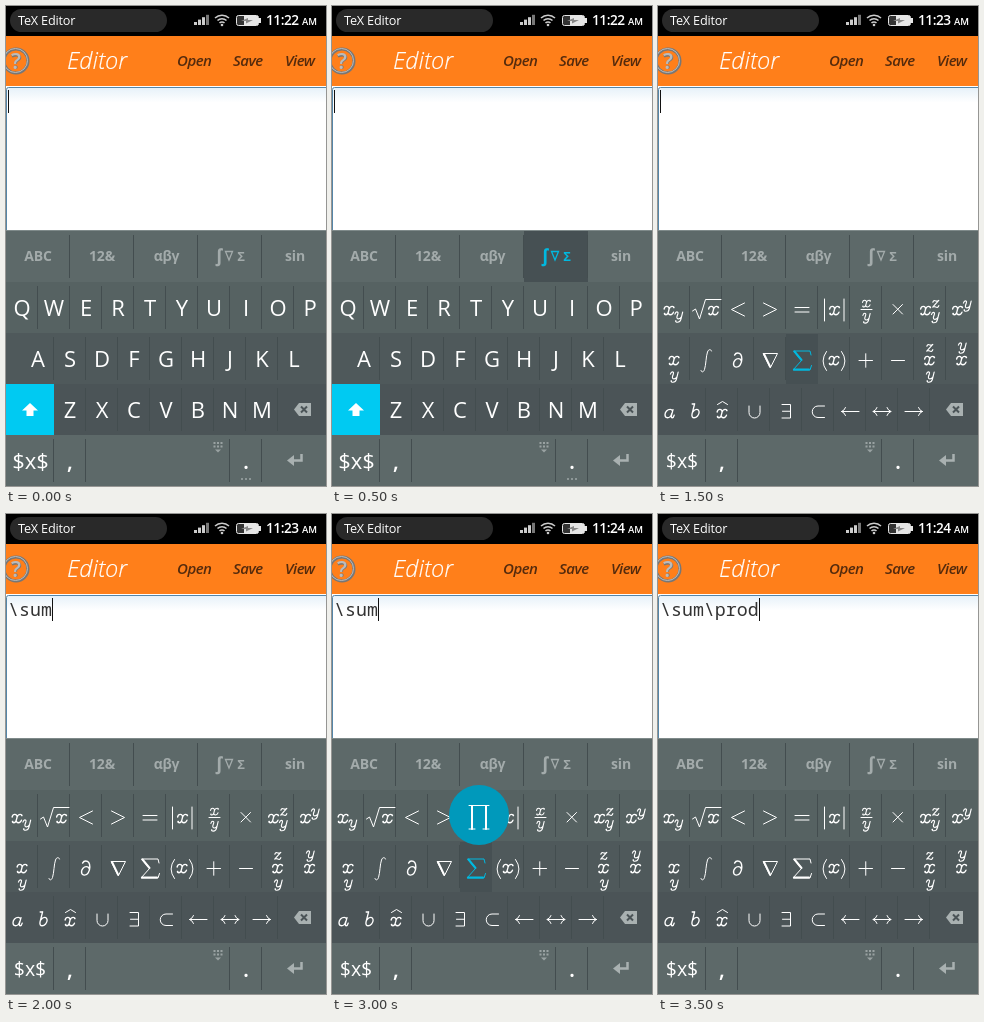
These frames come from a looping animation (320 px wide and 480 px high, 4 s). An HTML page:

```html
<!DOCTYPE html>
<html lang="en">
<head>
<meta charset="utf-8">
<title>TeX Editor</title>
<style>
html, body { margin: 0; width: 100%; height: 100%; overflow: hidden; background: #000; }
svg { display: block; width: 320px; height: 480px; font-family: "Open Sans", "Noto Sans", sans-serif; }
.mid { text-anchor: middle; }
.key { font-size: 22px; fill: #fff; }
.tab { font-size: 14px; font-weight: 700; letter-spacing: -.2px; fill: currentColor; }
.menu { font-size: 15px; font-style: italic; font-weight: 600; letter-spacing: -.5px; fill: #552b0d; }
.code { font: 18.3px "Noto Sans Mono", "DejaVu Sans Mono", monospace; fill: #333; white-space: pre; }
.ink { fill: none; stroke: #fff; stroke-linecap: round; stroke-linejoin: round; }
.letter { stroke-width: 1.35; }
.stem { stroke-width: 2; }
</style>
</head>
<body>
<svg id="stage" viewBox="0 0 320 480"></svg>
<script>
const CYAN = '#00b9e0', PRESSED = '#465053', ICON = '#a9b1b1', TAB = '#a3abab';

const rect = (x, y, w, h, fill, extra = '') =>
  `<rect x="${x}" y="${y}" width="${w}" height="${h}" fill="${fill}" ${extra}/>`;
const text = (s, x, y, cls, extra = '') => `<text x="${x}" y="${y}" class="${cls}" ${extra}>${s}</text>`;
const path = (d, extra = '') => `<path d="${d}" ${extra}/>`;
const stem = d => path(d, 'class="stem"');
const group = (id, body) => `<g id="${id}">${body}</g>`;

// Italic math letters as pen strokes; x-height runs from 0 to 9
const letters = {
  x: 'M.6 3C1 1.3 2 .4 3.2 .4c1.8 0 2.7 1.4 2.2 3.4l-.7 2.6C4.3 8 3.5 8.7 2.4 8.7 1.5 8.7 .8 8.3 .9 7.5h.5' +
     'M5.5 3.4C6 1.5 7.2 .4 8.8 .4c1 0 1.8 .4 1.7 1.2h-.5M4.7 6.2c-.2 1.6 .8 2.5 2.2 2.5 1.5 0 2.6-1 3.1-2.6',
  y: 'M.5 3C1 1.3 1.7 .4 2.7 .4c1.2 0 1.7 .9 1.3 2.2L3 5.6c-.6 2 .2 3.1 1.8 3.1 1.6 0 2.7-1 3.4-2.4' +
     'M9.6 .6 7.6 9C7 11.4 5.5 12.7 3.4 12.7c-1.4 0-2.3-.7-2.2-1.6h.6',
  z: 'M1 2.6C1.6 .9 2.6 .5 3.6 .9 5.4 1.7 6.5 1.5 8 .5L.8 8.3c1.6-1 2.6-.6 3.7 0 1.7 .8 3 .2 3.5-1.7',
  a: 'M8.4 1.6C8 .8 7.2 .4 6.2 .4 3.4 .4 1 3 1 5.8c0 1.8 .9 2.9 2.4 2.9 2 0 3.9-2 4.3-4.2' +
     'M9 .6 7.4 6.6c-.3 1.3 0 2.1 .9 2.1 1 0 1.5-1 1.9-2.6',
  b: 'M1.2-5 3.6-5.2 1 5.2C.6 7.4 1.5 8.7 3.1 8.7c2.6 0 5-2.8 5-5.4C8.1 1.4 7.1 .4 5.7 .4 4.2 .4 2.8 1.5 1.9 3',
  '∂': 'M1.5-2.8C2.3-4.4 3.4-4.8 4.4-4.8 7.4-4.8 8.4-1.5 8.4 1 8.4 5.3 6 8.7 3.4 8.7 1.6 8.7 .5 7.4 .5 5.6 ' +
     '.5 2.8 2.8 .6 5 .6 6.8 .6 7.8 1.8 8.1 3.2',
};
const math = (name, x, y, s = 1) =>
  path(letters[name], `class="letter" transform="translate(${x} ${y}) scale(${s})"`);
const small = (name, x, y) => math(name, x, y, .85);

const separators = (y, first, last, step = 32) => {
  let d = '';
  for (let x = first; x <= last; x += step) d += `M${x - .5} ${y + 4}v43`;
  return path(d, 'stroke="#434d4f"');
};
const keyRow = (chars, x, y) => [...chars].map((c, i) => text(c, x + 32 * i, y, 'key mid')).join('');

const statusBar = rect(0, 0, 320, 30, '#000') + rect(4, 3, 157, 23, '#292929', 'rx="11.5"') +
  text('TeX Editor', 12, 19, '', 'font-size="12.7" letter-spacing="-.2" fill="#fff"') +
  [0, 1, 2, 3].map(i => rect(188 + 4 * i, 16 - 2.4 * i, 3, 3 + 2.4 * i, i < 3 ? '#ccc' : '#777')).join('') +
  path('M209 12a10 10 0 0 1 14 0M211.500 14.500a6.500 6.500 0 0 1 9 0M213.500 17a3.500 3.500 0 0 1 5 0',
    'fill="none" stroke="#ccc" stroke-width="1.5"') +
  '<circle cx="216" cy="19" r="1.3" fill="#ccc"/>' +
  rect(230.5, 9.5, 22, 10, '#333', 'rx="2" stroke="#e6e6e6"') + rect(238, 10, 14, 9, '#e6e6e6') +
  rect(253, 12, 2, 5, '#e6e6e6') + path('M235 15l7-3v2h5l-7 3.500v-2.500z', 'fill="#888"') +
  text('', 260, 19, '', 'id="clock" font-size="13.7" font-weight="600" letter-spacing="-.5" fill="#fff"') +
  text('AM', 296, 19, '', 'font-size="9.5" font-weight="600" fill="#fff"');

const header = rect(0, 30, 320, 50, '#ff7f1a') +
  '<circle cx="10" cy="55" r="12" fill="none" stroke="#777" stroke-width="3"/>' +
  '<circle cx="9.5" cy="54.5" r="12" fill="none" stroke="#bbb" stroke-width="1"/>' +
  text('?', 10.5, 63, 'mid', 'font-size="22" font-weight="700" fill="#777"') +
  text('?', 10, 62.5, 'mid', 'font-size="22" font-weight="600" fill="#bbb"') +
  text('Editor', 61, 63, '', 'font-size="23.5" font-style="italic" font-weight="300" letter-spacing=".1" fill="#fff" stroke="#fff" stroke-width=".2"') +
  text('Open', 171, 60, 'menu') + text('Save', 227, 60, 'menu') + text('View', 279, 60, 'menu');

const editor = rect(0, 80, 320, 144, '#fff') +
  rect(.5, 81.5, 322, 150, 'url(#fade)', 'rx="2" stroke="#5586a8"') +
  text('', 2, 102, 'code', 'id="typed"') + rect(2, 84, 1, 23, '#111', 'id="caret"');

const rows = rect(0, 224, 320, 1, '#7f8a8a') +
  ['#5d6969', '#566262', '#4f595b', '#4b5457', '#5d6969'].map((fill, i) => rect(0, 225 + 51 * i, 320, 51, fill)).join('');

const tabs = group('tabPressed', rect(192, 225, 64, 51, PRESSED)) + separators(225, 64, 256, 64) +
  `<g color="${TAB}">` + text('ABC', 32, 255, 'tab mid') + text('12&amp;', 96, 255, 'tab mid') +
  text('αβγ', 160.5, 255, 'tab mid') + text('sin', 289, 255, 'tab mid') + '</g>' +
  group('symbolTab', text('∫', 213, 256, 'tab mid', 'style="font-size:18px"') +
    path('M219.500 245.500h7l-3.500 8.500z', 'fill="none" stroke="currentColor" stroke-width="1.3"') +
    text('Σ', 235, 255, 'tab mid', 'style="font-size:13px"'));

const dots = (x, y) => rect(x, y, 2, 2, ICON) + rect(x + 3.5, y, 2, 2, ICON) + rect(x + 7, y, 2, 2, ICON);
const sharedKeys = separators(429, 48, 80) + separators(429, 224, 256) +
  text(',', 64, 463, 'key mid', 'font-weight="600"') + text('.', 240, 463, 'key mid', 'font-weight="600"') +
  `<g opacity=".8">` + dots(207.5, 436) + dots(207.5, 439.5) + path('M209 443.500h6l-3 3z', `fill="${ICON}"`) + '</g>' +
  path('M295.500 448v6.500h-9', `fill="none" stroke="${ICON}" stroke-width="2.500"`) +
  path('M281 454.500l7-5.500v11z', `fill="${ICON}"`) +
  path('M288 403.500l5-6.500h12v13h-12z', `fill="${ICON}"`) +
  path('M295 400.500l6 6m0-6l-6 6', 'stroke="#4b5457" stroke-width="2"');

const latinKeys = separators(276, 32, 288) + separators(327, 48, 272) + separators(378, 80, 272) +
  keyRow('QWERTYUIOP', 16, 310) + keyRow('ASDFGHJKL', 32, 361) + keyRow('ZXCVBNM', 64, 412) +
  rect(0, 378, 48, 51, CYAN, 'style="fill:#00caf2"') +
  path('M24 397l8 7.500h-4.500v5.500h-7v-5.500h-4.500z', 'fill="#fff"') +
  text('$x$', 24.5, 463, 'key mid') +
  [235, 239, 243].map(x => rect(x, 472, 2, 2, '#8d9797')).join('');

const mathRow1 = '<g transform="translate(0 1)">' +
  math('x', 5.5, 299) + small('y', 16.5, 304.5) +
  path('M34.500 304l3-2 4 10 6-19.500h15.500') + math('x', 50, 299) +
  path('M86.500 296l-13 6.500 13 6.500M105.500 296l13 6.500-13 6.500M137 300.500h14m-14 4.500h14') +
  path('M166.500 292v22M186 292v22') + math('x', 171, 299) +
  math('x', 204, 293, .8) + path('M203 302.500h11') + math('y', 204.5, 306, .8) +
  path('M235 297.500l9.500 9.500m0-9.500l-9.500 9.500') +
  math('x', 262, 299) + small('z', 274, 293) + small('y', 273, 305) +
  math('x', 294, 299) + small('y', 305, 293.5) + '</g>';

const mathRow2 = math('x', 10.5, 350) + small('y', 12, 365.5) +
  path('M53.500 345c-.5-2-3-2-4 1-1.500 4-1.500 13-3 17.500-1 3-3 3-3.500 1') +
  math('∂', 75, 352, 1.05) + path('M105.500 347.500h14l-7 14z') + stem('M106 348l6 12.500') +
  group('sum', path('M153 349l-1-4h-16.500l8 9.500-8.500 9.500h17l1.500-4.500') + stem('M136.500 345.500l7 8.500m-7.500 9.500h15')) +
  path('M168.500 345.500q-7 9.500 0 19M183.500 345.500q7 9.500 0 19') + math('x', 170.5, 350) +
  path('M201 354.500h13.500m-6.750-6.750v13.500M233.500 354.500h13') +
  small('z', 268, 338) + math('x', 266, 350) + small('y', 268, 365.5) +
  small('y', 300, 336.5) + math('x', 298, 350);

const mathRow3 = math('a', 6, 403) + math('b', 33, 403) +
  math('x', 58.5, 403) + path('M59.500 398.500l5-3 5 3') +
  path('M91 400v6.500a5.500 5.500 0 0 0 11 0v-6.500M124 398.500h8.500v13.500h-8.500m.5-6.750h8M166.500 400h-6.500a5.750 5.750 0 0 0 0 11.500h6.500') +
  path('M201 405.500h-17.500m4-4q-1 3-4 4 3 1 4 4M215 405.500h18m-14-4q-1 3-4 4 3 1 4 4m10-8q1 3 4 4-3 1-4 4') +
  path('M247 405.500h17.500m-4-4q1 3 4 4-3 1-4 4');

const mathKeys = separators(276, 32, 288) + separators(327, 32, 288) + separators(378, 48, 272) +
  group('sumPressed', rect(128, 328, 32, 50, PRESSED)) +
  `<g class="ink">${mathRow1}${mathRow2}${mathRow3}</g>` +
  text('$x$', 24, 462, 'key mid', 'style="font-size:19.500px;font-weight:500"') +
  group('popup', '<circle cx="147" cy="301" r="30" fill="#0099bb"/>' +
    '<g class="ink">' + path('M137 291.500h20m-20 23.500h6m8 0h6') + stem('M140 292v23m14-23v23') + '</g>');

const $ = id => document.getElementById(id);
$('stage').innerHTML =
  '<defs><linearGradient id="fade" x2="0" y2="1"><stop stop-color="#e6f1f9"/><stop offset=".1" stop-color="#fff"/></linearGradient></defs>' +
  statusBar + header + editor + rows + tabs + sharedKeys + group('latin', latinKeys) + group('math', mathKeys);

const show = (id, on) => $(id).style.display = on ? '' : 'none';

function draw(now) {
  const step = Math.floor(now % 4000 / 500);
  const typed = step < 4 ? '' : step < 7 ? '\\sum' : '\\sum\\prod';
  const sumDown = step === 3 || step === 5 || step === 6;
  $('clock').textContent = '11:' + (step < 3 ? 22 : step < 5 ? 23 : 24);
  $('typed').textContent = typed;
  $('caret').setAttribute('x', 2 + 11 * typed.length);
  show('latin', step < 2);
  show('math', step >= 2);
  show('tabPressed', step === 1);
  $('symbolTab').setAttribute('color', step === 1 ? CYAN : TAB);
  show('sumPressed', sumDown);
  $('sum').style.stroke = sumDown ? CYAN : '';
  show('popup', step === 6);
}

const start = performance.now();
function tick() {
  draw(performance.now() - start);
  requestAnimationFrame(tick);
}
tick();
</script>
</body>
</html>
```
